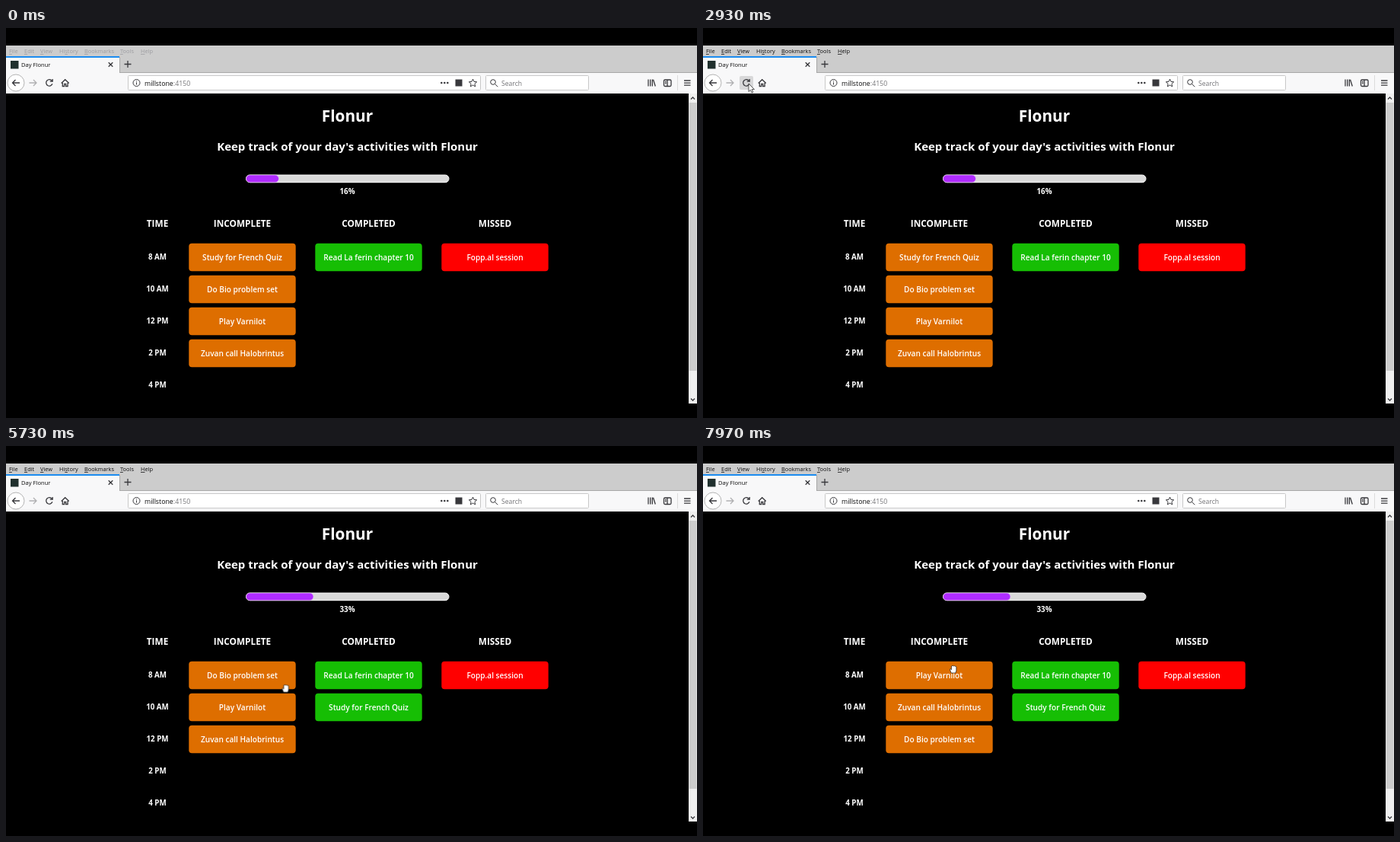
Animation of 908 by 512 pixels, one loop 8000 ms. Source, as an HTML page:

```html
<!DOCTYPE html>
<html lang="en">
<head>
<meta charset="utf-8">
<title>Day Flonur</title>
<style>
html, body { margin: 0; width: 100%; height: 100%; overflow: hidden; background: #000; }
svg { display: block; width: 908px; height: 512px; font-family: "Open Sans", "Noto Sans", sans-serif; }
text { white-space: pre; }

/* every animation shares one 8 s clock; 1% = 80 ms */
.step, .card { animation: 8s step-end infinite; }

/* browser chrome */
.ui { fill: #0c0c0d; font-size: 7.6px; }
.menu { font-size: 7.4px; fill: #9c9ca0; animation-name: focus; }
.menu tspan { text-decoration: underline; }
.icon { fill: none; stroke: #38383c; stroke-width: 1.3; }
.thin { stroke-width: 1; }
.field { fill: #fff; stroke: #c8c8c8; }
@keyframes focus { 13.375%, 100% { fill: #0c0c0d; } }

/* page */
.page { fill: #fff; text-anchor: middle; font-weight: 700; }
.head { font-size: 11.8px; }
.time { font-size: 9.8px; }
.task { font-size: 10.1px; font-weight: 600; fill: currentColor; }
.fill { fill: #b02cff; animation: grow 8s infinite; }
.before { animation-name: before; }
.after { animation-name: after; }
@keyframes grow {
  0%, 63.9% { width: 43px; animation-timing-function: ease; }
  67.8%, 100% { width: 88.5px; }
}
@keyframes before { 0% { visibility: visible; } 63.9%, 100% { visibility: hidden; } }
@keyframes after { 0% { visibility: hidden; } 63.9%, 100% { visibility: visible; } }

/* cards */
.card { color: #fff; fill: #de6e00; }
.done { fill: #16be04; }
.missed { fill: #f00; }
.french { animation-name: french; }
.bio { animation-name: bio; }
.game { animation-name: game; }
.call { animation-name: call; }
@keyframes french {
  0% { transform: translate(310.5px, 301px); fill: #de6e00; color: #fff; }
  51.625% { transform: translate(310.5px, 301px); fill: #2c1600; color: #4a4030; }
  57.5% { transform: translate(476.5px, 343px); fill: #042600; color: #4a4030; }
  63.75%, 100% { transform: translate(476.5px, 343px); fill: #16be04; color: #fff; }
}
@keyframes bio {
  0% { transform: translate(310.5px, 343px); fill: #de6e00; color: #fff; }
  57.5% { transform: translate(310.5px, 301px); fill: #de6e00; color: #fff; }
  74.375% { transform: translate(310.5px, 301px); fill: #2c1600; color: #4a4030; }
  77% { transform: translate(310.5px, 343px); fill: #2c1600; color: #4a4030; }
  85% { transform: translate(310.5px, 385px); fill: #2c1600; color: #4a4030; }
  87.5%, 100% { transform: translate(310.5px, 385px); fill: #de6e00; color: #fff; }
}
@keyframes game {
  0% { transform: translate(310.5px, 385px); }
  57.5% { transform: translate(310.5px, 343px); }
  77%, 100% { transform: translate(310.5px, 301px); }
}
@keyframes call {
  0% { transform: translate(310.5px, 427px); }
  57.5% { transform: translate(310.5px, 385px); }
  85%, 100% { transform: translate(310.5px, 343px); }
}

/* reload */
.hover { animation-name: hover; }
.loading { animation-name: loading; }
.dot { animation: bounce 8s infinite ease-in-out; }
@keyframes hover { 0% { visibility: hidden; } 26% { visibility: visible; } 37.8%, 100% { visibility: hidden; } }
@keyframes loading { 0% { visibility: hidden; } 30.375% { visibility: visible; } 35.875%, 100% { visibility: hidden; } }
@keyframes bounce {
  0%, 30.375%, 33%, 35.875%, 100% { transform: translateX(7px); }
  31.625%, 34.5% { transform: translateX(0); }
}

/* pointer, with the dragged card attached */
.move { animation: move 8s infinite ease-in-out; }
.arrow { animation-name: arrow; }
.hand { animation-name: hand; }
.drag1 { animation-name: drag1; }
.drag2 { animation-name: drag2; }
.arrow, .hand { fill: #fff; stroke: #111; stroke-width: .7; }
.ghost { fill: rgb(125 125 125 / .88); color: #dedede; }
@keyframes move {
  0%, 16.625% { transform: translate(290px, 484px); animation-timing-function: ease-out; }
  20.375%, 22.5% { transform: translate(96px, 105px); }
  27.125%, 37% { transform: translate(60px, 73px); }
  47%, 50.875% { transform: translate(333px, 308px); }
  58.375%, 60.86% { transform: translate(440px, 335px); }
  60.87%, 61.22% { transform: translate(448px, 343px); }
  61.25%, 63.75% { transform: translate(452px, 350px); }
  73.75%, 74.375% { transform: translate(359px, 315px); }
  78.37%, 81.625% { transform: translate(357px, 355px); }
  87.5%, 92.125% { transform: translate(355px, 396px); }
  99.6%, 100% { transform: translate(329px, 293px); }
}
@keyframes arrow { 0% { visibility: hidden; } 16.625% { visibility: visible; } 46%, 100% { visibility: hidden; } }
@keyframes hand { 0% { visibility: hidden; } 46%, 100% { visibility: visible; } }
@keyframes drag1 { 0% { visibility: hidden; } 51.625% { visibility: visible; } 63.75%, 100% { visibility: hidden; } }
@keyframes drag2 { 0% { visibility: hidden; } 74.375% { visibility: visible; } 87.5%, 100% { visibility: hidden; } }
</style>
</head>
<body>
<svg viewBox="0 0 908 512">
  <defs>
    <rect id="box" x="-70.2" y="-18.3" width="140.4" height="36.6" rx="4"/>
    <rect id="lift" x="-70" y="-25" width="140" height="42" rx="3"/>
  </defs>
  <rect width="908" height="512"/>

  <!-- menu and tabs -->
  <rect y="23" width="908" height="36" fill="#ccc"/>
  <g class="menu step">
    <text x="4" y="33"><tspan>F</tspan>ile</text>
    <text x="24" y="33"><tspan>E</tspan>dit</text>
    <text x="45" y="33"><tspan>V</tspan>iew</text>
    <text x="70" y="33">Hi<tspan>s</tspan>tory</text>
    <text x="103" y="33"><tspan>B</tspan>ookmarks</text>
    <text x="150" y="33"><tspan>T</tspan>ools</text>
    <text x="177" y="33"><tspan>H</tspan>elp</text>
  </g>
  <path d="M149 58.5H908M149.5 38V58" stroke="#a8a8a8"/>
  <rect y="59" width="908" height="27" fill="#f8f8f9"/>
  <rect y="37" width="149" height="22" fill="#f8f8f9"/>
  <rect y="37" width="149" height="2" fill="#1c8cf0"/>
  <rect x="6" y="43" width="10.5" height="10.5" fill="#20302e"/>
  <text class="ui" x="20" y="51">Day Flonur</text>
  <path class="icon" d="M134.7 45.2l5.6 5.6m0-5.6l-5.6 5.6M155.5 47.5h9m-4.5-4.5v9"/>

  <!-- toolbar -->
  <rect class="hover step" x="48" y="63" width="18" height="18" rx="2" fill="#d8d8d9"/>
  <circle cx="13" cy="72" r="11" fill="#fff" stroke="#b4b4b4"/>
  <path class="icon" d="M18 72H8.5m4-4l-4 4l4 4"/>
  <path class="icon" style="stroke:#b0b0b2" d="M30.5 72h9.5m-4-4l4 4l-4 4"/>
  <path class="icon" d="M60.4 69.5a4.2 4.2 0 1 0 .5 3.8M61.2 67v3.2h-3.4"/>
  <path class="icon" d="M72.7 72.5l5-4.8l5 4.8M74.3 72v4.5h2.4v-3h2v3h2.4v-4.5"/>
  <rect class="field" x="160.5" y="62.5" width="463" height="19" rx="1"/>
  <rect class="field" x="630.5" y="62.5" width="135" height="19" rx="1"/>
  <g class="icon thin">
    <circle cx="171.5" cy="72" r="4.5"/>
    <path d="M171.5 71.3v3.2m0-5.2v1"/>
    <circle cx="640" cy="71" r="3.3"/>
    <path d="M642.5 73.5l3.7 3.7"/>
  </g>
  <text class="ui" x="182" y="76" style="font-size:8.8px">millstone<tspan fill="#77777a">:4150</tspan></text>
  <text x="651" y="76" font-size="8.6" fill="#727276">Search</text>
  <g fill="#38383c">
    <circle cx="572.3" cy="72" r="1.3"/>
    <circle cx="576.3" cy="72" r="1.3"/>
    <circle cx="580.3" cy="72" r="1.3"/>
    <rect x="590.5" y="67.5" width="9" height="9"/>
  </g>
  <path class="icon thin" d="M613.5 67l1.5 3.4l3.7 .4l-2.8 2.5l.8 3.6l-3.2-1.9l-3.2 1.9l.8-3.6l-2.8-2.5l3.7-.4z"/>
  <path class="icon" d="M844 67.5v9m2.7-9v9m2.6-9v9m1.2-8.8l2.8 8.8"/>
  <rect class="icon" x="864.5" y="68" width="9.5" height="8.5" rx="1.5"/>
  <path class="icon" d="M869 68v8.5m-3-6h1.6m-1.6 2h1.6"/>
  <path d="M882.5 62v20" stroke="#dcdcdc"/>
  <path class="icon" d="M891 69h8.5m-8.5 3.1h8.5m-8.5 3.1h8.5"/>

  <!-- page -->
  <g class="page">
    <text x="448.5" y="123.3" font-size="20.8">Flonur</text>
    <text x="448.5" y="161.3" font-size="15">Keep track of your day's activities with Flonur</text>
    <rect x="315.5" y="193" width="266.5" height="9.7" rx="4.85" fill="#dadada" stroke="#fff"/>
    <rect class="fill" x="315.5" y="193" width="43" height="9.7" rx="4.85" stroke="#e8d0f4" stroke-width=".6"/>
    <g class="time">
      <text class="before step" x="448.5" y="218">16%</text>
      <text class="after step" x="448.5" y="218">33%</text>
      <text x="199" y="303.5">8 AM</text>
      <text x="199" y="345.5">10 AM</text>
      <text x="199" y="387.5">12 PM</text>
      <text x="199" y="429.5">2 PM</text>
      <text x="199" y="471.5">4 PM</text>
    </g>
    <g class="head">
      <text x="199" y="261.3">TIME</text>
      <text x="310.5" y="261.3">INCOMPLETE</text>
      <text x="476.5" y="261.3">COMPLETED</text>
      <text x="642.5" y="261.3">MISSED</text>
    </g>
    <g class="card done" transform="translate(476.5 301)"><use href="#box"/><text class="task" y="3.7">Read La ferin chapter 10</text></g>
    <g class="card missed" transform="translate(642.5 301)"><use href="#box"/><text class="task" y="3.7">Fopp.al session</text></g>
    <g class="card french"><use href="#box"/><text class="task" y="3.7">Study for French Quiz</text></g>
    <g class="card bio"><use href="#box"/><text class="task" y="3.7">Do Bio problem set</text></g>
    <g class="card game"><use href="#box"/><text class="task" y="3.7">Play Varnilot</text></g>
    <g class="card call"><use href="#box"/><text class="task" y="3.7">Zuvan call Halobrintus</text></g>
  </g>
  <rect x="897" y="86" width="11" height="407" fill="#f0f0f0"/>
  <rect x="897.5" y="98" width="10" height="352" fill="#cdcdcd"/>
  <path class="icon" d="M900 93.5l2.5-2.5l2.5 2.5M900 486.5l2.5 2.5l2.5-2.5"/>

  <!-- loading state -->
  <g class="loading step">
    <rect y="86" width="908" height="407" fill="#fdfdfd"/>
    <rect y="479" width="176" height="14" fill="#f5f5f6"/>
    <text class="ui" x="3" y="489">Waiting for millstone...</text>
    <rect x="4" y="42" width="14" height="13" fill="#f8f8f9"/>
    <circle class="dot" cx="7" cy="48" r="1.5" fill="#38383c"/>
  </g>

  <g class="move">
    <g class="page">
      <g class="ghost drag1 step"><g transform="translate(-24 -8)"><use href="#lift"/><text class="task" y="3.7">Study for French Quiz</text></g></g>
      <g class="ghost drag2 step"><g transform="translate(-48 -14.5)"><use href="#lift"/><text class="task" y="3.7">Do Bio problem set</text></g></g>
    </g>
    <path class="arrow step" d="M0 0V10.5L2.4 8.3L4.1 12L5.8 11.3L4.2 7.6H7.4Z"/>
    <path class="hand step" d="M-2.8 5L-4.5 .8q-.2-1.7 1.1-1l.8 .9V-4q.8-1.2 1.6 0q.8-1.6 1.7 0q1-1 1.7 .3q1.2-.6 1.5 .8V2L2.8 5Z"/>
  </g>
</svg>
</body>
</html>
```
